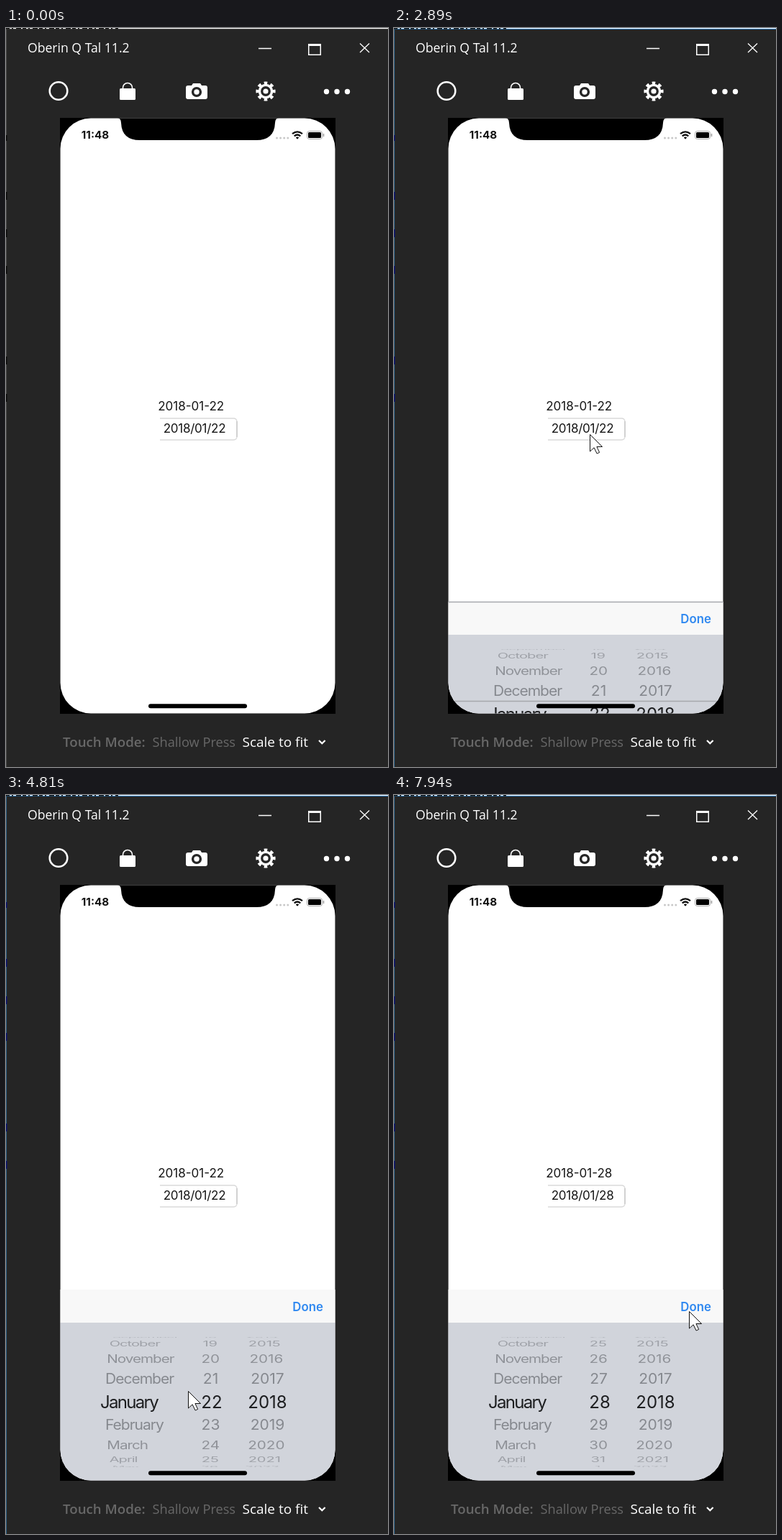
Write an HTML page that moves like this. It is 531 px wide and 1028 px high and loops after 8000 ms.

```html
<!DOCTYPE html>
<html lang="en">
<head>
<meta charset="utf-8">
<title>Date picker</title>
<style>
  html, body { margin: 0; width: 100%; height: 100%; overflow: hidden; background: #252525; }
  svg { display: block; width: 531px; height: 1028px; font-family: Inter, sans-serif; }
  .ui { font-family: "Open Sans", "Noto Sans", sans-serif; }
  .line { fill: none; stroke: #fff; }
  .day, .year { text-anchor: middle; }
  #outer { font-size: 21px; fill: #85888e; }
  #inner { font-size: 24px; fill: #1d1e20; }
  #outer .month { letter-spacing: -.047em; }
  #inner .month { letter-spacing: -.07em; }
</style>
</head>
<body>
<svg viewBox="0 0 531 1028">
  <defs>
    <clipPath id="screen"><rect x="75.5" y="125.5" width="382" height="828" rx="42.5"/></clipPath>
    <clipPath id="band"><rect x="75" y="828" width="383" height="34"/></clipPath>
    <clipPath id="rim"><path d="M75 754H458V827H75zM75 863H458V935H75z"/></clipPath>
  </defs>
  <rect width="531" height="1028" fill="#252525"/>

  <!-- window edge with slivers of the page behind -->
  <rect width="531" height="1" fill="#fff"/>
  <path id="top" d="M0 1.5H531"/>
  <path id="side" d="M.5 1V1028"/>
  <path d="M0 .8H156" stroke="#111" stroke-width="1.6" stroke-dasharray="5 3 2 4 7 2"/>
  <path id="ticks" d="M.5 149v8M.5 228v11M.5 280v11M.5 331v11M.5 457v11M.5 509v11" stroke-width="2"/>

  <!-- title bar -->
  <text class="ui" x="30" y="34" font-size="17.6" fill="#fff">Oberin Q Tal 11.2</text>
  <path class="line" d="M351 28.5H369M492 21.5l13 12.5M505 21.5l-13 12.5" stroke-width="1.3"/>
  <path d="M420 22h18v16h-18zM421.5 25v11.5h15V25z" fill="#fff" fill-rule="evenodd"/>

  <!-- toolbar -->
  <circle class="line" cx="73" cy="87.5" r="12.3" stroke-width="2.6"/>
  <rect x="158" y="84" width="22" height="16" rx="1.5" fill="#fff"/>
  <path class="line" d="M162.5 85v-2a6.5 6.5 0 0 1 13 0v2" stroke-width="1.6"/>
  <path d="M253 80h5l2-3h10l2 3h5q3 0 3 3v13q0 3-3 3h-24q-3 0-3-3V83q0-3 3-3z" fill="#fff"/>
  <circle cx="265" cy="89" r="5.4" fill="#fff" stroke="#252525" stroke-width="3.4"/>
  <circle class="line" cx="361" cy="88" r="8.6" stroke-width="3.4"/>
  <circle class="line" cx="361" cy="88" r="11.6" stroke-width="4" pathLength="16" stroke-dasharray="1" stroke-dashoffset=".5"/>
  <circle cx="361" cy="88" r="3.6" fill="#fff"/>
  <path class="line" d="M445.5 88.5h30" stroke-width="7.4" stroke-linecap="round" stroke-dasharray="0 14.5"/>

  <!-- phone -->
  <rect x="75" y="125" width="383" height="829"/>
  <g clip-path="url(#screen)">
    <rect x="75" y="125" width="383" height="829" fill="#fff"/>
    <path d="M155 125q5 1 5 7q1 24 26 24h162q25 0 26-24q0-6 5-7z"/>
    <text x="104.8" y="154" font-size="15.2" font-weight="700" fill="#111">11:48</text>
    <path d="M376.5 153h16" stroke="#c8c8c8" stroke-width="3" stroke-linecap="round" stroke-dasharray="0 5.1"/>
    <path d="M398 147.2q7-5.8 14 0M400.7 150.3q4.3-3.6 8.6 0" fill="none" stroke="#111" stroke-width="2.2"/>
    <path d="M402.8 152.3q2.2-1.8 4.4 0l-2.2 2.4z"/>
    <rect x="418.5" y="143.5" width="21" height="11" rx="3" fill="none" stroke="#aaa"/>
    <rect x="420" y="145" width="18" height="8" rx="1.5"/>
    <path d="M441.5 147v4" stroke="#999" stroke-width="1.4"/>

    <text id="label" x="211.2" y="532.2" font-size="17" fill="#151515"></text>
    <path d="M214 543H316q5 0 5 5v20q0 5-5 5H214" fill="none" stroke="#dadada" stroke-width="1.3"/>
    <path d="M321 547v22" stroke="#bdbdbd"/>
    <text id="field" x="218.7" y="563" font-size="17" letter-spacing="-.25" fill="#151515"></text>

    <g id="sheet">
      <rect x="75" y="688" width="383" height="46" fill="#f8f8f8"/>
      <text x="398.3" y="717.5" font-size="16.8" font-weight="600" fill="#2f88f0">Done</text>
      <rect x="75" y="734" width="383" height="230" fill="#d1d4db"/>
      <g id="outer" clip-path="url(#rim)"></g>
      <g id="inner" clip-path="url(#band)"></g>
      <path id="rules" d="M75 688.5H458M75 826.5H458M75 862.5H458" stroke="#a6a8ad" stroke-width="1.3"/>
    </g>
    <rect x="198" y="940.3" width="137" height="6" rx="3"/>
  </g>

  <!-- footer -->
  <g class="ui">
    <text x="79" y="1000" font-size="18.7" font-weight="600" fill="#686868">Touch Mode:</text>
    <text x="203.5" y="1000" font-size="18.2" fill="#686868">Shallow Press</text>
    <text x="328.5" y="1000" font-size="19" fill="#fff">Scale to fit</text>
  </g>
  <path class="line" d="M435 991l4.3 4.3l4.3-4.3" stroke-width="2.2"/>

  <path id="cursor" d="M.5.5V24l5.6-5.2 4 8.2 3.5-1.6-3.7-7.9h7.6z" fill="#fff" stroke="#111" stroke-width="1"/>
</svg>
<script>
const LOOP = 8000;
const STEP = 78; // the screen updates at this interval during a move
const $ = id => document.getElementById(id);
const wrap = (i, n) => (i % n + n) % n;
const monthName = i => new Date(2018, wrap(i, 12)).toLocaleString('en', { month: 'long' });

// Eased progress in whole updates; the first one already moves
function progress(t, from, to) {
  if (t < from) return 0;
  const n = Math.round((to - from) / STEP) + 1;
  const k = Math.floor((t - from) / STEP) + 1;
  return 1 - (1 - Math.min(1, k / n)) ** 1.5;
}

// Pointer moves: from time, to time, x, y reached
const ENTRY = [398, 943];
const MOVES = [
  [310, 690, 303, 695],
  [1020, 1690, 272, 565],
  [3500, 4080, 219, 817],
  [4270, 4270, 219, 820],
  [4810, 4810, 253, 829],
  [4888, 5280, 285, 876],
  [5580, 6360, 279, 675],
  [6440, 6752, 282, 781],
  [6830, 7220, 312, 858],
  [7450, 7940, 410, 718]];

const pointer = t => MOVES.reduce(([x, y], [from, to, toX, toY]) => {
  const f = progress(t, from, to);
  return [x + (toX - x) * f, y + (toY - y) * f];
}, ENTRY);

// The sheet rises in a few visible jumps
const sheetOffset = t => t < 2930 ? 110 : t < 3100 ? 26 : t < 3160 ? 1 : 0;

// Wheel columns: rim x, band x, text of an item
const COLUMNS = {
  month: [138, 131, monthName],
  day: [284.5, 286, i => wrap(i - 1, 31) + 1],
  year: [363.5, 363.5, i => 2018 + i]
};
const MID = 844.2, AXIS = 267, RADIUS = 91.5, TURN = 20.5 * Math.PI / 180;

for (const id of ['outer', 'inner'])
  for (const name in COLUMNS) $(id).innerHTML += `<g class="${name}"></g>`;

function drawColumn(name, pos) {
  const [rimX, bandX, text] = COLUMNS[name];
  let rim = '', band = '';
  for (let i = Math.ceil(pos - 4.35); i <= pos + 4.35; i++) {
    const d = i - pos, c = Math.cos(d * TURN);
    const p = 1 - .095 * (Math.cos(TURN) - c); // perspective towards the axis
    const x = AXIS + (rimX - AXIS) * p, y = MID + RADIUS * Math.sin(d * TURN);
    rim += `<text y="7.6" opacity="${Math.min(1, .3 + .75 * c)}" transform="translate(${x} ${y}) scale(${p} ${Math.max(c, .01)})">${text(i)}</text>`;
    if (Math.abs(d) < 1) band += `<text x="${bandX}" y="${MID + 8.7 + d * 34}">${text(i)}</text>`;
  }
  document.querySelector('#outer .' + name).innerHTML = rim;
  document.querySelector('#inner .' + name).innerHTML = band;
}

const show = (id, on) => $(id).setAttribute('visibility', on ? 'inherit' : 'hidden');
const stroke = (id, color) => $(id).setAttribute('stroke', color);
const move = (id, x, y) => $(id).setAttribute('transform', `translate(${x} ${y})`);

function draw(t) {
  const focused = t >= 2250;
  stroke('top', focused ? '#2b7cc0' : '#4a4a4a');
  stroke('side', focused ? '#2f6288' : '#4a4a4a');
  stroke('ticks', focused ? '#0a1470' : '#0c0c0c');

  const spin = progress(t, 5580, 6596);
  drawColumn('day', 22 + 6 * spin);
  const day = spin < 1 ? 22 : 28;
  $('label').textContent = '2018-01-' + day;
  $('field').textContent = '2018/01/' + day;

  show('sheet', t >= 2890);
  show('rules', t >= 2890 && t < 3160);
  move('sheet', 0, sheetOffset(t));

  show('cursor', t >= 310);
  move('cursor', ...pointer(t).map(Math.round));
}

drawColumn('month', 0);
drawColumn('year', 0);
const start = performance.now();
(function tick() {
  draw((performance.now() - start) % LOOP);
  requestAnimationFrame(tick);
})();
</script>
</body>
</html>
```
